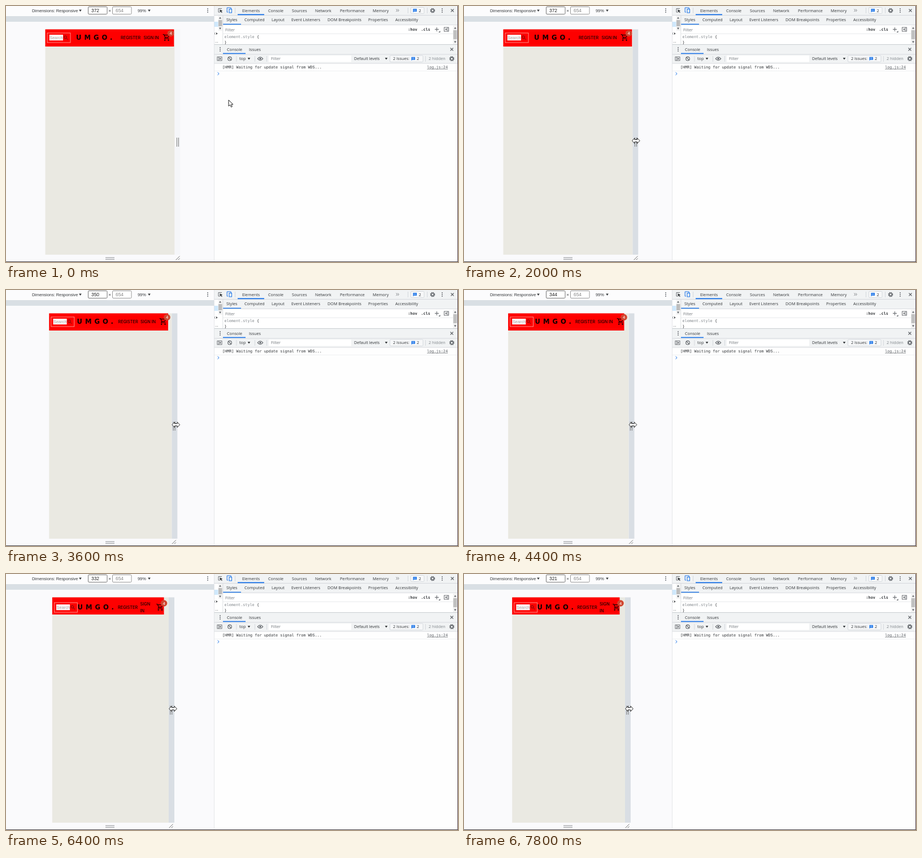
Recreate the animation shown at these times as an HTML page. Size 800x455 px, loop 8000 ms.

```html
<!DOCTYPE html>
<html lang="en">
<head>
<meta charset="utf-8">
<title>Responsive header</title>
<style>
html, body { margin: 0; width: 100%; height: 100%; overflow: hidden; background: #fafafc; }
svg { display: block; }
text { white-space: pre; }
.ui { font-family: "Open Sans", sans-serif; font-size: 7.25px; }
.dim { font-family: "Liberation Sans", Arial, sans-serif; font-size: 7.4px; }
.code { font-family: "DejaVu Sans Mono", monospace; font-size: 6.8px; }
.nav { font-family: Inter, sans-serif; font-size: 7.3px; font-weight: 500; }
.logo { font-family: "DejaVu Sans", sans-serif; font-size: 11.6px; font-weight: 700; letter-spacing: 5px; }
.badge { font-family: Roboto, sans-serif; font-size: 7.5px; }
</style>
</head>
<body>
<svg id="stage" width="100%" height="100%" viewBox="0 0 800 455" preserveAspectRatio="none"></svg>
<script>
const LOOP = 8000, STEP = 200;
const INK = '#333639', GREY = '#5f6368', BLUE = '#1a73e8', BAR = '#f1f3f4', LINE = '#cfd3d8';

const rect = (x, y, w, h, fill, more = '') =>
  `<rect x="${x}" y="${y}" width="${w}" height="${h}" fill="${fill}" ${more}/>`;
const text = (x, y, s, cls = 'ui', fill = INK, more = '') =>
  `<text x="${x}" y="${y}" class="${cls}" fill="${fill}" ${more}>${s}</text>`;
const path = (d, color = GREY, width = 1, more = '') =>
  `<path d="${d}" fill="none" stroke="${color}" stroke-width="${width}" ${more}/>`;
const solid = (d, fill = GREY) => `<path d="${d}" fill="${fill}"/>`;
const group = (id, body) => `<g id="${id}">${body}</g>`;
const hline = (x, y, w, c = LINE) => rect(x, y, w, .8, c);
const vline = (x, y, h, c = LINE) => rect(x, y, .8, h, c);
const down = (x, y, r = 2.3, c = INK) => solid(`M${x - r} ${y - r * .7}h${2 * r}l${-r} ${r * 1.6}z`, c);
const up = (x, y) => solid(`M${x - 2} ${y + 1.5}h4l-2 -3z`);
const dots = (x, y) => [-3, 0, 3].map(d => `<circle cx="${x}" cy="${y + d}" r=".9" fill="${GREY}"/>`).join('');
const cross = (x, y) => path(`M${x - 2.5} ${y - 2.5}l5 5m0 -5l-5 5`, GREY, 1.1);
const gear = (x, y) =>
  `<circle cx="${x}" cy="${y}" r="3.6" fill="none" stroke="${GREY}" stroke-width="1.6" stroke-dasharray="1.7 1.13"/>` +
  `<circle cx="${x}" cy="${y}" r="2.4" fill="none" stroke="${GREY}" stroke-width="1.4"/>`;
const bubble = (x, y) => solid(`M${x} ${y}h6.5v5h-5l-1.5 1.6z`, BLUE) + path(`M${x + 1.3} ${y + 1.7}h4m-4 1.7h4`, '#fff', .5);
const row = (y, items) => items.map(([x, s]) => text(x, y, s)).join('');

function deviceBar() {
  return rect(0, 0, 368, 18, '#fcfcfd') + rect(0, 18, 368, 10, '#d9dfe4') +
    text(46, 11, 'Dimensions: Responsive', 'dim') + down(131.5, 8) +
    rect(145.5, 1.5, 33.5, 13, '#fff', 'stroke="#777" rx="1.5"') +
    rect(188.5, 1.5, 33.5, 13, '#fff', 'stroke="#999" rx="1.5"') +
    text(181.5, 11, '×', 'dim') +
    text(194, 11.3, '654', 'dim', '#888', 'style="font-size:8.4px"') +
    text(233, 11, '99%', 'dim') + down(253.5, 8) + dots(357, 8);
}

function stylesPane() {
  return rect(368, 0, 432, 17, BAR) + hline(368, 16.2, 432) +
    path('M382 4.5h-6v6.5h2.5', GREY, .9) + solid('M378.3 6.3l5 2.2 -2.1 .8 1.6 2.3 -1 .7 -1.6 -2.4 -1.3 1.5z', INK) +
    path('M393 11h-1.8v-8h7v2', BLUE, 1) + rect(395, 5.5, 4.5, 6.5, BAR, `stroke="${BLUE}"`) + vline(405, 3, 10) +
    row(10.6, [[418, 'Elements'], [464, 'Console'], [506, 'Sources'], [547, 'Network'], [591, 'Performance'], [649, 'Memory']]) +
    rect(410, 14.4, 47, 1.8, BLUE) + path('M690.5 5.5l2 2.3 -2 2.3m2.8 -4.6l2 2.3 -2 2.3', GREY, .8) + vline(711, 3, 10) +
    rect(716.5, 2.5, 23.5, 11, '#f7f8f9', `stroke="${LINE}" stroke-width=".8" rx="1.5"`) + bubble(720.5, 5) + text(730.5, 10.6, '2') +
    vline(745, 3, 10) + gear(755, 8) + dots(772, 8) + cross(790, 8) +
    rect(384, 17, 416, 16, BAR) +
    row(27.2, [[390, 'Styles'], [422, 'Computed'], [470, 'Layout'], [505, 'Event Listeners'], [569, 'DOM Breakpoints'], [641, 'Properties'], [689, 'Accessibility']]) +
    rect(384, 31.7, 32, 1.6, BLUE) + hline(384, 33.3, 416) +
    rect(368, 17, 16, 51, '#fff') + rect(368, 28, 8, 9, '#cfe8fc') +
    rect(375.5, 17, 8, 27, '#f3f3f3') + rect(376, 25, 6.5, 11, '#bdbdbd') + up(379, 21) + down(379, 40, 2, GREY) +
    path('M370.5 47l-1.5 2 1.5 2', GREY, .7) + solid('M372 47l2.5 2 -2.5 2z', INK) + text(370, 65, '...', 'ui', GREY) + vline(383.5, 17, 51) +
    rect(384.5, 34.2, 416, 34, '#fff') + text(388, 44.5, 'Filter', 'ui', '#70757a') +
    text(711.5, 44, ':hov', 'code', INK, 'font-weight="700"') + text(734.5, 44, '.cls', 'code', INK, 'font-weight="700"') +
    path('M759 41.5h7m-3.5 -3.5v7', GREY, 1) + solid('M768.5 44v3h-3z') +
    rect(775.5, 38, 8, 7, '#fff', `stroke="${GREY}" stroke-width=".9"`) + solid('M777 41.5l3 -2v4z') + vline(781, 38, 7, GREY) +
    hline(384, 48.8, 407, '#e1e3e6') +
    text(386.5, 57.3, 'element.style', 'code', '#80868b') + text(443.9, 57.3, '{', 'code') + text(386.5, 67, '}', 'code') +
    rect(791, 35, 8, 33, '#f3f3f3') + rect(791.7, 43, 6.5, 16, '#c1c1c1') + up(795, 39) + down(795, 64, 2, GREY);
}

function consolePane() {
  return rect(368, 68.3, 432, 34, BAR) + hline(368, 68.2, 432, '#bfc3c8') + dots(379, 77) +
    row(79.7, [[391, 'Console'], [430, 'Issues']]) + rect(384, 83.6, 40, 1.7, BLUE) + cross(789, 77) + hline(368, 85.6, 432) +
    rect(374, 90.5, 8, 6.5, BAR, `stroke="${GREY}" stroke-width=".9"`) + vline(376, 90.5, 6.5, GREY) + solid('M378 91.7l3 2 -3 2z') +
    `<circle cx="396" cy="93.7" r="3.3" fill="none" stroke="${GREY}" stroke-width="1.1"/>` + path('M393.7 91.4l4.6 4.6', GREY, 1.1) +
    vline(407.5, 89, 10) + text(413, 96.3, 'top') + down(430, 93.5) + vline(440, 89, 10) +
    path('M445.3 93.7q4.7 -6 9.4 0q-4.7 6 -9.4 0z', GREY, 1.1) + `<circle cx="450" cy="93.7" r="1.6" fill="${GREY}"/>` + vline(461, 89, 10) +
    rect(465, 88, 146, 11.5, '#fff') + text(469, 96.3, 'Filter', 'ui', '#70757a') +
    text(616, 96.3, 'Default levels') + down(673, 93.5) +
    rect(679.5, 88, 58.5, 11.5, '#f7f8f9', `stroke="${LINE}" stroke-width=".8" rx="1.5"`) +
    text(685, 96.3, '2 Issues:') + bubble(717.5, 90.7) + text(727, 96.3, '2') + vline(742, 89, 10) +
    text(748, 96.3, '2 hidden', 'ui', '#80868b') + gear(789, 93.7) +
    rect(368, 102, 432, 353, '#fefefe') + hline(368, 101.6, 432) +
    text(383, 110.8, '[HMR] Waiting for update signal from WDS...', 'code') +
    text(782, 110.8, 'log.js:24', 'code', GREY, 'text-anchor="end" text-decoration="underline"') +
    hline(368, 115, 432, '#eceef0') + path('M374.5 118l2.6 2.4 -2.6 2.4', BLUE, 1) + vline(368, 0, 455, '#dfe1e5');
}

function device() {
  return rect(0, 41.5, 0, 400.5, '#d9dee4', 'id="edge"') + rect(0, 41.5, 0, 400.5, '#eae9e2', 'id="page"') +
    path('M176 447.2h16m-16 3h16', '#8a8d91', 1) +
    group('corner', path('M-3.5 3.5l7 -7m-3 7l3 -3', '#777', 1)) +
    group('grip', path('M-1.5 234v16m3 -16v16', '#777', 1)) +
    rect(0, 41.5, 0, 30.5, '#fe0000', 'id="head"') +
    group('search',
      rect(0, 48, 41, 17, 'none', 'stroke="#ff9c94" stroke-width=".9"') +
      '<svg x="3.5" y="51" width="24.5" height="10.5">' + rect(0, 0, 24.5, 10.5, '#fdf8f8') +
      text(.8, 7.8, 'Search', 'dim', '#a5a0a0') + '</svg>' +
      '<circle cx="32" cy="55.3" r="2.3" fill="none" stroke="#5c1010" stroke-width=".9"/>' + path('M33.7 57l2.8 2.8', '#5c1010', 1)) +
    group('logo', text(0, 60.3, 'UMGO.', 'logo', '#120000')) +
    group('register', text(0, 59.3, 'REGISTER', 'nav', '#1a0000')) +
    group('sign', text(0, 59.3, 'SIGN IN', 'nav', '#1a0000', 'id="signOne"') +
      group('signTwo', text(0, 56.2, 'SIGN', 'nav', '#1a0000') + text(0, 68.2, 'IN', 'nav', '#1a0000'))) +
    group('cart', '<g transform="translate(0 48.7) scale(.6)">' +
      path('M1 3h3l4 9h8l4.5 -7H5.5M8 12l-1.7 3.5H19.5', '#1c0000', 2) +
      '<circle cx="7" cy="20" r="2" fill="#1c0000"/><circle cx="17.5" cy="20" r="2" fill="#1c0000"/></g>') +
    group('badge', '<circle cy="48.5" r="5.8" fill="#d1452f"/>' + text(0, 51.2, '4', 'badge', '#fff', 'text-anchor="middle"'));
}

const stage = document.getElementById('stage');
stage.innerHTML = rect(0, 0, 800, 455, '#fafafc') + deviceBar() +
  text(151, 11.3, '', 'dim', '#222', 'id="width" style="font-size:8.4px"') +
  device() + stylesPane() + consolePane() +
  rect(0, 454, 800, 1, '#47434a') + rect(799, 0, 1, 455, '#5b4a55') +
  group('arrow', '<path d="M0 0v11l2.6 -2.3 1.9 4 1.9 -.9 -1.9 -3.8h3.4z" fill="#fff" stroke="#222" stroke-width="1"/>') +
  '<circle id="touch" r="5.6" fill="#807f7d"/>' +
  group('resize', '<path d="M-6.8 0l4.5 -4.8v2.9h4.6v-2.9l4.5 4.8 -4.5 4.8v-2.9h-4.6v2.9z" fill="#fff" stroke="#222" stroke-width="1"/>');

const el = {};
stage.querySelectorAll('[id]').forEach(n => el[n.id] = n);

// Rows start with their key; values are interpolated, and extended past the ends.
function at(rows, k) {
  let i = 1;
  while (i < rows.length - 1 && k > rows[i][0]) i++;
  const a = rows[i - 1], b = rows[i], u = (k - a[0]) / (b[0] - a[0]);
  return a.slice(1).map((v, j) => v + (b[j + 1] - v) * u);
}

// time, viewport width
const WIDTHS = [[0, 372], [2400, 372], [2800, 362], [3600, 350], [4400, 344], [4800, 339], [6000, 339], [6400, 332], [7800, 321]];
// time, pointer x, pointer y
const POINTER = [[0, 394, 167], [400, 385, 171], [800, 225, 198], [1000, 122, 208], [1200, 181, 181], [1600, 250, 222], [2000, 304, 240]];
// viewport width, page right, header right, logo, register, sign in, cart, badge
const WIDE = [
  [344, 291.5, 283.5, 125.5, 197, 236.5, 270, 283],
  [350, 293.3, 287, 125.5, 198.5, 238, 271, 285],
  [362, 297, 293, 125, 201.5, 241.5, 275, 289],
  [372, 298.3, 297.3, 124, 203, 243.5, 277, 291.5]];
const WRAPPED = [
  [321, 285, 275.5, 129.5, 200.5, 240, 262.5, 277],
  [332, 288, 279.5, 126.5, 198, 237.5, 265.5, 279.5]];

const move = (n, x, y = 0) => n.setAttribute('transform', `translate(${x} ${y})`);
const show = (n, on) => n.setAttribute('visibility', on ? 'visible' : 'hidden');
const span = (n, a, b) => { n.setAttribute('x', a); n.setAttribute('width', b - a); };

function draw(ms) {
  const t = Math.floor(ms % LOOP / STEP) * STEP;
  const w = Math.round(at(WIDTHS, t)[0]);
  const wrapped = w < 338, dy = wrapped ? 3 : 0;
  const [right, head, logo, register, sign, cart, badge] = at(wrapped ? WRAPPED : WIDE, w);
  const left = 184.25 - .3085 * w;
  const onEdge = t >= 2000;

  el.width.textContent = w;
  span(el.page, left, right);
  span(el.head, left, head);
  span(el.edge, right, right + 10);
  el.edge.setAttribute('fill', onEdge ? '#d9dee4' : '#f5f6f9');
  move(el.corner, w === 372 ? 304 : right + 4, 448);
  move(el.grip, right + (w === 372 ? 5.7 : 4.3));
  move(el.search, left + 3.5, dy);
  move(el.logo, logo, dy);
  move(el.register, register, dy);
  move(el.sign, sign);
  show(el.signOne, !wrapped);
  show(el.signTwo, wrapped);
  move(el.cart, cart, dy);
  move(el.badge, badge, dy + (wrapped ? .5 : 0));

  const [x, y] = onEdge ? [right + (w === 372 ? 6 : 7.5), 239.5] : at(POINTER, t);
  const inPage = x > left && x < right && y > 41;
  move(el.arrow, x, y);
  move(el.touch, x, y);
  move(el.resize, x, y);
  show(el.arrow, !onEdge && !inPage);
  show(el.touch, !onEdge && inPage);
  show(el.resize, onEdge);
}

const start = performance.now();
function tick() {
  draw(performance.now() - start);
  requestAnimationFrame(tick);
}
tick();
</script>
</body>
</html>
```
